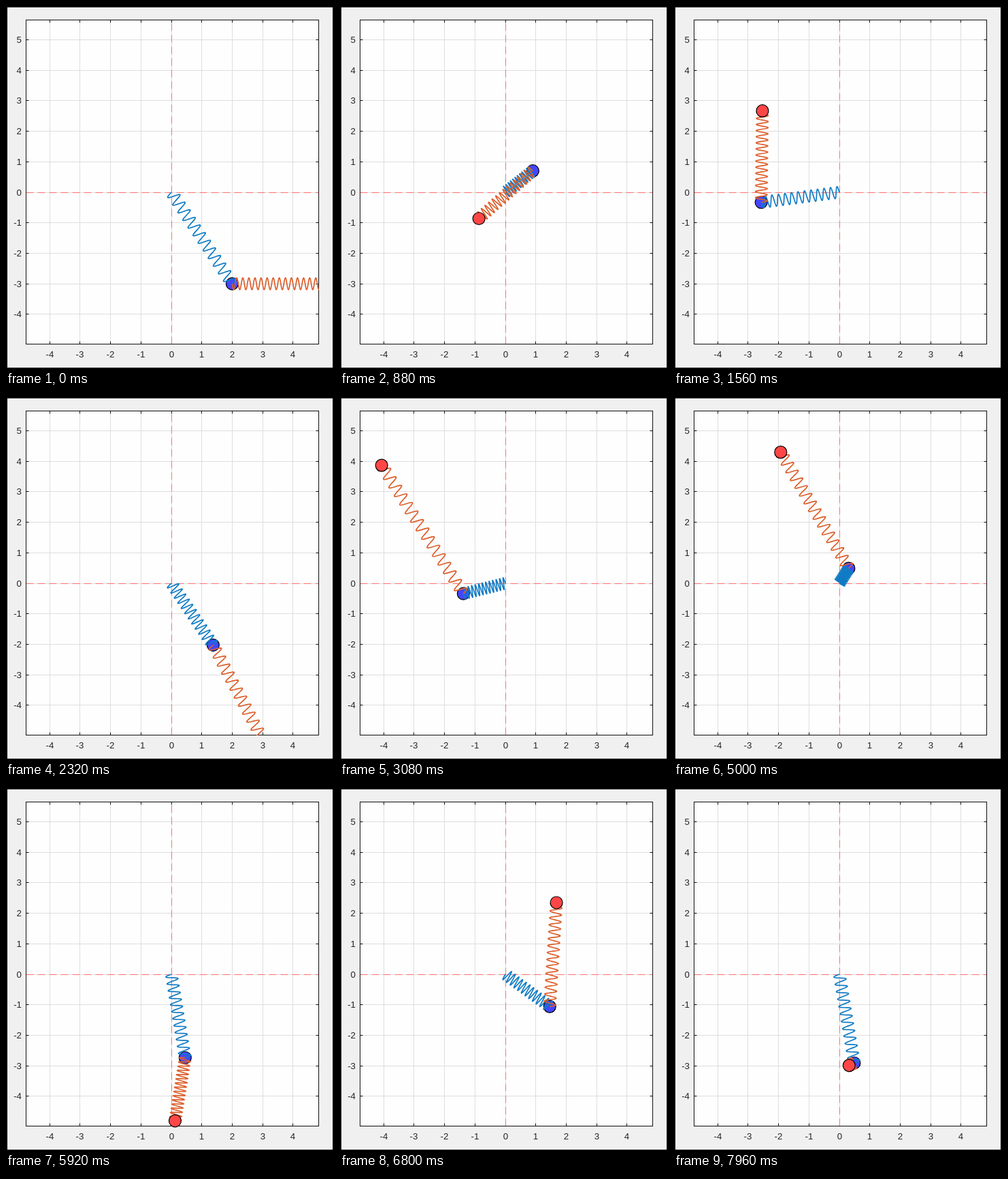
An HTML page that plays this animation: 482 px wide and 532 px high, repeating every 8 s.

```html
<!DOCTYPE html>
<html lang="en">
<head>
<meta charset="utf-8">
<title>Double spring pendulum</title>
<style>
  html, body { margin: 0; width: 100%; height: 100%; overflow: hidden; background: #000; }
  svg { display: block; width: 482px; height: 532px; }
  text { font: 13.3px "Liberation Sans", Arial, sans-serif; fill: #262626; }
  .grid { stroke: #dedede; }
  .tick, .box { stroke: #111; fill: none; }
  .zero { stroke: #ff7070; stroke-dasharray: 11 6; }
  .spring { fill: none; stroke-width: 1.7; stroke-linejoin: round; }
  .mass { stroke: #000; stroke-width: 1.2; }
</style>
</head>
<body>
<svg viewBox="0 0 482 532">
  <defs><clipPath id="area"><rect x="29" y="20" width="431" height="476"/></clipPath></defs>
  <rect width="482" height="532" fill="#000"/>
  <rect x="2" y="2" width="478" height="528" fill="#f0f0f0"/>
  <rect x="29.5" y="20.5" width="430" height="475" fill="#fefefe"/>
  <g id="axes"></g>
  <path class="zero" d="M29.5 273.5H459.5M243.5 495.5V20.5"/>
  <rect class="box" x="29.5" y="20.5" width="430" height="475"/>
  <circle class="mass" id="blue" r="9" fill="#4446ff"/>
  <g clip-path="url(#area)">
    <path class="spring" id="inner" stroke="#107bc4"/>
    <path class="spring" id="outer" stroke="#dc5f2c"/>
  </g>
  <circle class="mass" id="red" r="9" fill="#ff4646"/>
</svg>
<script>
const UNIT = 44.68, LOOP = 8000, STEP = 40, HOLD = 320;
const BOX = { left: 29.5, right: 459.5, top: 20.5, bottom: 495.5 };
const $ = id => document.getElementById(id);
const px = x => 243 + x * UNIT;
const py = y => 273 - y * UNIT;

// Smooth curve through key points [step, x, y], starting at rest
function curve(keys) {
  const last = keys.length - 1;
  const gap = i => keys[i + 1][0] - keys[i][0];
  const rate = (i, k) => (keys[i + 1][k] - keys[i][k]) / gap(i);
  const slopes = [1, 2].map(k => {
    const m = keys.map(() => 0);
    for (let sweep = 0; sweep < 60; sweep++) {
      for (let i = 1; i < last; i++) {
        const g = gap(i - 1), h = gap(i);
        m[i] = (3 * (h * rate(i - 1, k) + g * rate(i, k)) - h * m[i - 1] - g * m[i + 1]) / (2 * (g + h));
      }
      m[last] = (3 * rate(last - 1, k) - m[last - 1]) / 2;
    }
    return m;
  });
  return s => {
    let i = 0;
    while (i < last - 1 && keys[i + 1][0] <= s) i++;
    const h = gap(i), u = Math.min(1, (s - keys[i][0]) / h), v = 1 - u;
    return [1, 2].map(k => {
      const m = slopes[k - 1];
      return v * v * (1 + 2 * u) * keys[i][k] + u * u * (3 - 2 * u) * keys[i + 1][k] +
        h * u * v * (v * m[i] - u * m[i + 1]);
    });
  };
}

// Turning points and crossings of each mass, in axis units
const blueAt = curve([
  [0, 2, -3], [5, .8, -.6], [11, .95, 1.2], [19, 0, -.8], [31, -2.57, -.33],
  [37, -1.2, .55], [51, 1.4, -2.2], [69, -1.38, -.34], [77, -2, 1], [86, -.25, .17],
  [98, 1.3, -2.5], [117, .31, .49], [125, -.45, 1.3], [141, .55, -2.9],
  [162, 1.46, -1.06], [186, .7, -4.3], [191, .49, -2.91]
]);
const redAt = curve([
  [0, 5, -3], [5, 4.4, -3.15], [13, -.2, -1.3], [21, -4.2, 2.4], [31, -2.53, 2.67],
  [42, 1.52, -4.57], [49, 3.4, -6.1], [63, -1, .67], [69, -4.07, 3.87], [86, -1.3, -2.37],
  [97, 3.2, -6.1], [105, 2.69, -4.32], [117, -1.93, 4.3], [126, -1.84, 3.85],
  [145, .7, -6.1], [162, 1.68, 2.35], [168, 1.86, 4.39], [191, .32, -2.99]
]);

function spring(x0, y0, x1, y1, coils) {
  const dx = x1 - x0, dy = y1 - y0, len = Math.hypot(dx, dy) || 1;
  const n = coils * 16, pts = [];
  for (let i = 0; i <= n; i++) {
    const u = i / n, w = 8.7 * Math.sin(u * coils * 2 * Math.PI) / len;
    pts.push((x0 + dx * u - dy * w).toFixed(2) + " " + (y0 + dy * u + dx * w).toFixed(2));
  }
  return "M" + pts.join("L");
}

function place(el, x, y) {
  el.setAttribute("cx", x);
  el.setAttribute("cy", y);
  const inside = x >= BOX.left && x <= BOX.right && y >= BOX.top && y <= BOX.bottom;
  el.style.display = inside ? "" : "none";
}

function drawAxes() {
  const snap = v => Math.floor(v) + .5;
  const { left, right, top, bottom } = BOX;
  let grid = "", ticks = "", labels = "";
  for (let v = -4; v <= 5; v++) {
    const y = snap(py(v));
    grid += `M${left} ${y}H${right}`;
    ticks += `M${left} ${y}h4M${right} ${y}h-4`;
    labels += `<text x="23" y="${y + 4.5}" text-anchor="end">${v}</text>`;
    if (v > 4) continue;
    const x = snap(px(v));
    grid += `M${x} ${top}V${bottom}`;
    ticks += `M${x} ${top}v4M${x} ${bottom}v-4`;
    labels += `<text x="${x}" y="515" text-anchor="middle">${v}</text>`;
  }
  $("axes").innerHTML = `<path class="grid" d="${grid}"/><path class="tick" d="${ticks}"/>${labels}`;
}

function draw(ms) {
  const s = Math.max(0, Math.floor((ms - HOLD) / STEP));
  const [bx, by] = blueAt(s), [rx, ry] = redAt(s);
  const b = [px(bx), py(by)], r = [px(rx), py(ry)];
  $("inner").setAttribute("d", spring(px(0), py(0), ...b, 12));
  $("outer").setAttribute("d", spring(...b, ...r, 15));
  place($("blue"), ...b);
  place($("red"), ...r);
}

drawAxes();
draw(0);
const start = performance.now();
function tick() {
  draw((performance.now() - start) % LOOP);
  requestAnimationFrame(tick);
}
requestAnimationFrame(tick);
</script>
</body>
</html>
```
